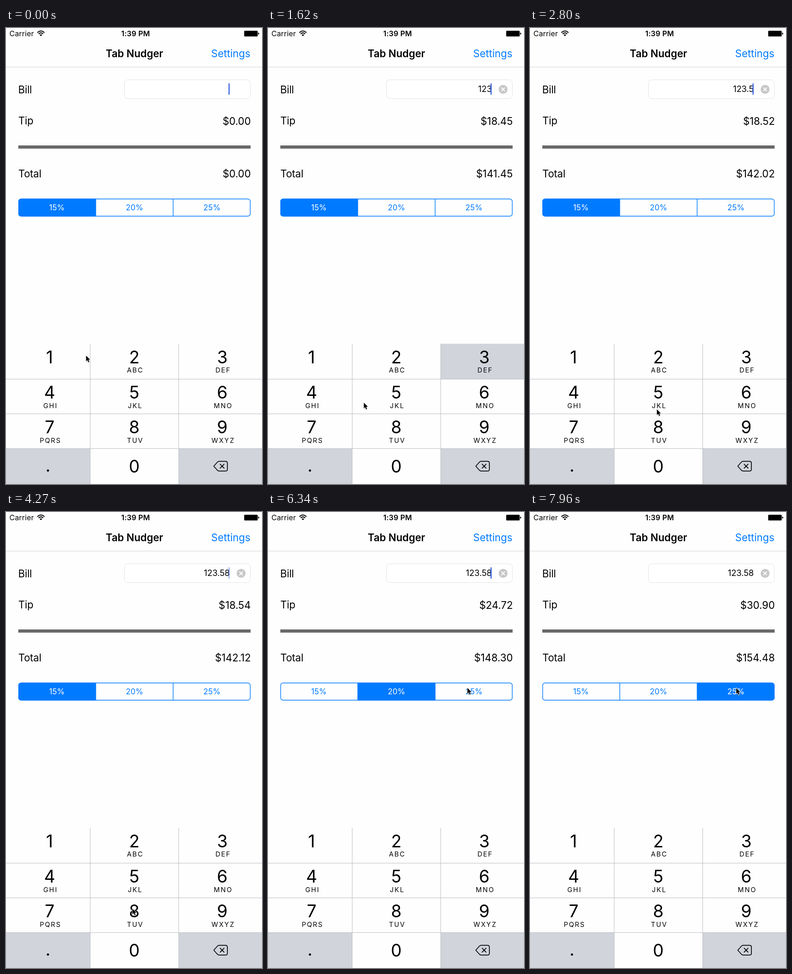
These frames come from a looping animation (561 px wide and 998 px high, 8000 ms). An HTML page:

```html
<!DOCTYPE html>
<html lang="en">
<head>
<meta charset="utf-8">
<title>Tip calculator</title>
<style>
  html, body { margin: 0; width: 100%; height: 100%; overflow: hidden; background: #fefefe; }
  svg { display: block; width: 561px; height: 998px; }
  text { font-family: Inter, Roboto, "Liberation Sans", sans-serif; font-size: 22.3px; fill: #000; white-space: pre; }
  .mid { text-anchor: middle; }
  .end { text-anchor: end; }
  .label { letter-spacing: -0.2px; }
  .status { font-size: 16px; letter-spacing: 0.2px; }
  .bold { font-weight: 600; }
  .bill { font-size: 18.4px; }
  .seg { font-size: 17.1px; }
  .digit { font-size: 37.5px; }
  .letters { font-size: 14.6px; letter-spacing: 2px; }
</style>
</head>
<body>
<svg id="stage" viewBox="0 0 561 998">
  <defs>
    <clipPath id="pill"><rect x="27" y="373.5" width="509" height="39" rx="6"/></clipPath>
    <filter id="soft" x="-50%" y="-50%" width="200%" height="200%"><feGaussianBlur stdDeviation="1.1"/></filter>
  </defs>
  <rect width="561" height="998" fill="#fefefe"/>

  <text class="status" x="7.5" y="18">Carrier</text>
  <g fill="none" stroke="#000" stroke-width="2.1">
    <path d="M68.8 10.2Q76.5 2.8 84.2 10.2M71.5 13Q76.5 8.2 81.5 13"/>
    <path d="M76.5 18L73.7 15.1Q76.5 12.7 79.3 15.1Z" fill="#000" stroke="none"/>
  </g>
  <text class="status bold mid" x="284" y="18">1:39 PM</text>
  <rect x="522" y="6" width="29.5" height="12.5" rx="1.5"/>
  <path d="M552.5 10Q555 10.2 555 12.2T552.5 14.5Z"/>

  <text class="bold mid" x="281.5" y="64">Tab Nudger</text>
  <text class="end" x="535.5" y="64" style="fill:#007aff">Settings</text>
  <path d="M0 85.5H561" stroke="#d6d6d6"/>

  <text class="label" x="26.8" y="143">Bill</text>
  <text class="label" x="27" y="211">Tip</text>
  <text class="label" x="27" y="327">Total</text>
  <rect x="259.5" y="113.5" width="276" height="41" rx="7" fill="#fff" stroke="#e2e2e2"/>
  <text class="bill end" id="bill" x="490.5" y="140.2"></text>
  <rect id="caret" x="487.6" y="121" width="2.6" height="25" rx="1" fill="#4169e1"/>
  <g id="clear">
    <circle cx="515.2" cy="134.3" r="9.8" fill="#c8c8c9"/>
    <path d="M511.4 130.5l7.6 7.6m0-7.6l-7.6 7.6" stroke="#fff" stroke-width="1.8"/>
  </g>
  <text class="end" id="tip" x="536.5" y="212"></text>
  <rect x="27" y="257" width="509" height="7" fill="#696969"/>
  <text class="end" id="total" x="536.5" y="327"></text>

  <g id="segments"></g>
  <g id="keys"></g>
  <g id="pointer">
    <path d="M0 1.5V14L2.8 11.4L5 16.2L7.2 15.2L5 10.6H8.8Z" opacity=".4" filter="url(#soft)"/>
    <path d="M0 0V12.4L2.8 9.8L5 14.6L7.2 13.6L5 9H8.8Z" stroke="#fff" stroke-width="1.6" paint-order="stroke"/>
  </g>
</svg>
<script>
const LOOP = 8000, STEP = 147.4;
const BLUE = "#007aff", GREY = "#d1d4db", WHITE = "#fefefe";
const $ = id => document.getElementById(id);

function add(parent, tag, attrs, text) {
  const el = document.createElementNS("http://www.w3.org/2000/svg", tag);
  for (const name in attrs) el.setAttribute(name, attrs[name]);
  if (text) el.textContent = text;
  parent.appendChild(el);
  return el;
}

// Tip rate control
const rates = [15, 20, 25];
const segX = [27, 196.7, 366.3, 536];
const segments = rates.map((rate, i) => ({
  fill: add($("segments"), "rect", {
    x: segX[i], y: 373, width: segX[i + 1] - segX[i], height: 40, "clip-path": "url(#pill)"
  }),
  label: add($("segments"), "text", { class: "seg mid", x: [111.5, 281.5, 451.3][i], y: 399.4 }, rate + "%")
}));
add($("segments"), "rect", {
  x: 27.7, y: 374.2, width: 507.6, height: 37.6, rx: 5.3, fill: "none", stroke: BLUE, "stroke-width": 1.4
});
add($("segments"), "path", { d: "M196.7 374V412M366.3 374V412", stroke: BLUE, "stroke-width": 1.4 });

// Number pad
const colX = [0, 184.5, 378.5, 561], rowY = [691, 768.5, 844.5, 920.5, 998];
const digitX = [95.5, 281.2, 474], digitY = [733.5, 811, 887, 973];
const letters = ["", "ABC", "DEF", "GHI", "JKL", "MNO", "PQRS", "TUV", "WXYZ"];
const keys = {};
[..."123456789.0<"].forEach((key, i) => {
  const c = i % 3, r = Math.floor(i / 3), pad = $("keys");
  keys[key] = add(pad, "rect", {
    x: colX[c], y: rowY[r], width: colX[c + 1] - colX[c], height: rowY[r + 1] - rowY[r]
  });
  if (key === "<") return;
  add(pad, "text", { class: "digit mid", x: key === "." ? 92 : digitX[c], y: digitY[r] - (key === "." ? 2.5 : 0) }, key);
  if (letters[i]) add(pad, "text", { class: "letters mid", x: digitX[c] + 2, y: digitY[r] + 20.9 }, letters[i]);
});
add($("keys"), "path", {
  d: "M184.5 691V998M378.5 691V998M0 768.5H561M0 844.5H561M0 920.5H561", stroke: "#bcbdc0"
});
add($("keys"), "path", {
  d: "M455.3 959L463.6 949.8Q465 948.4 467 948.4H481Q485.2 948.4 485.2 952.6V965.4Q485.2 969.6 481 969.6H467Q465 969.6 463.6 968.2Z" +
     "M468.8 954.2l9.6 9.6m0-9.6l-9.6 9.6",
  fill: "none", stroke: "#000", "stroke-width": 1.7, "stroke-linejoin": "round"
});

// Presses: key, first and last highlighted step, step at which the character appears
const presses = [
  ["1", 3, 3, 4], ["2", 7, 7, 8], ["3", 10, 11, 11],
  [".", 13, 13, 14], ["5", 18, 18, 19], ["8", 21, 22, 22]
];

// Pointer stops: step, x, y
const stops = [
  [0, 175.5, 717], [1, 140, 720], [3, 100, 722], [4, 100, 722], [6, 277, 727], [8, 277, 727],
  [10, 468, 727], [11, 210, 820], [13, 92, 957], [14, 92, 957], [16, 277, 800], [18, 277, 800],
  [19, 278, 834.5], [20, 277, 868], [29, 277, 868], [32, 258, 640], [36, 272, 386],
  [39, 280, 388], [40, 280, 388], [43, 437, 385], [45, 450, 388], [50, 452, 389], [52, 452, 389], [54, 452, 385.5]
];

function pointerAt(step) {
  const i = stops.findIndex(s => s[0] >= step);
  if (i < 1) return stops[0].slice(1);
  const [a, ax, ay] = stops[i - 1], [b, bx, by] = stops[i];
  const u = (step - a) / (b - a), e = u * u * (3 - 2 * u);
  return [ax + (bx - ax) * e, ay + (by - ay) * e];
}

function caretAt(step) {
  if (step > 3 && step < 24) return 1;
  const start = step < 4 ? 110 : 3790;
  const p = (step * STEP - start + 1000) % 1000;
  const clamp = v => Math.min(1, Math.max(0, v));
  return p < 430 ? clamp(1 - p / 100) : clamp((p - 430) / 110);
}

// Currency with ties rounded to the even cent
function money(value) {
  const cents = value * 100;
  const tie = Math.abs(cents - Math.floor(cents) - 0.5) < 1e-6;
  return "$" + ((tie ? 2 * Math.round(cents / 2) : Math.round(cents)) / 100).toFixed(2);
}

function draw(time) {
  const step = Math.min(54, Math.floor((time + 5) / STEP));
  const bill = presses.filter(p => step >= p[3]).map(p => p[0]).join("");
  const chosen = step < 38 ? 0 : step < 46 ? 1 : 2;
  const amount = Number(bill), tip = amount * rates[chosen] / 100;

  $("bill").textContent = bill;
  $("tip").textContent = money(tip);
  $("total").textContent = money(amount + tip);
  $("clear").setAttribute("visibility", bill ? "visible" : "hidden");
  $("caret").setAttribute("opacity", caretAt(step));

  segments.forEach((s, i) => {
    s.fill.setAttribute("fill", i === chosen ? BLUE : WHITE);
    s.label.style.fill = i === chosen ? "#fff" : BLUE;
  });
  for (const key in keys) {
    const down = presses.some(p => p[0] === key && step >= p[1] && step <= p[2]);
    const special = key === "." || key === "<";
    keys[key].setAttribute("fill", down !== special ? GREY : WHITE);
  }
  $("pointer").setAttribute("transform", `translate(${pointerAt(step)})`);
}

const begin = performance.now();
function tick() {
  draw((performance.now() - begin) % LOOP);
  requestAnimationFrame(tick);
}
tick();
</script>
</body>
</html>
```
